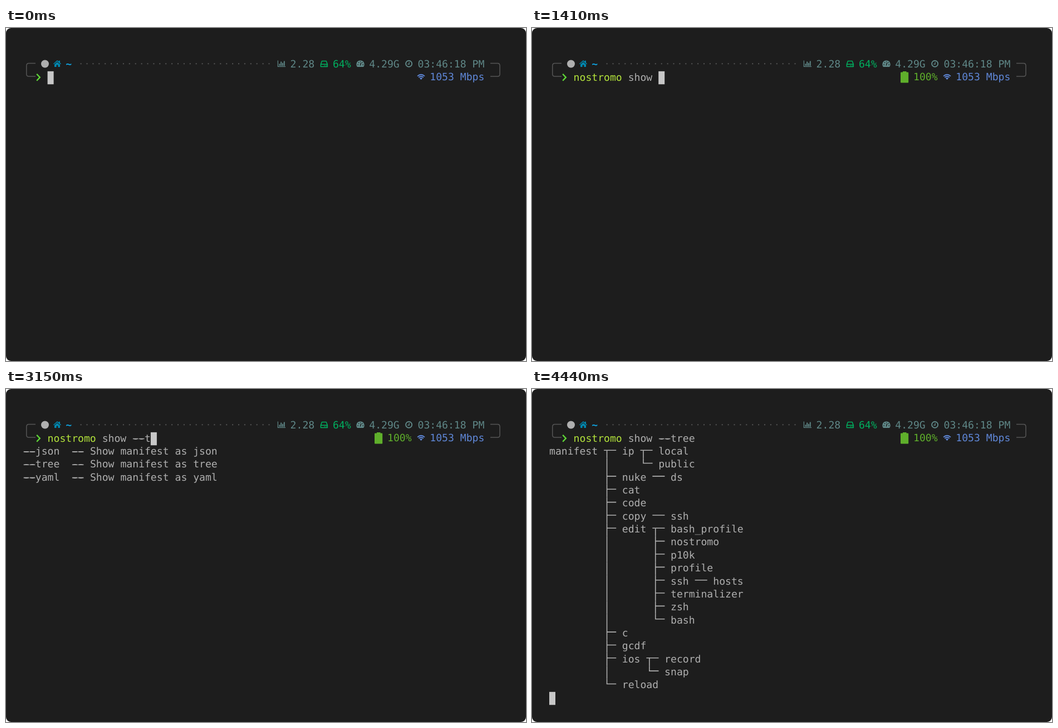
Write an HTML page that moves like this. It is 934 by 599 pixels and loops after 6440 ms.

```html
<!DOCTYPE html>
<html lang="en">
<head>
<meta charset="utf-8">
<title>Terminal session</title>
<style>
  html, body { margin: 0; width: 100%; height: 100%; overflow: hidden; background: #fff; }
  svg { display: block; width: 934px; height: 599px; }
  text { font: 18.1px "DejaVu Sans Mono", monospace; text-rendering: geometricPrecision; }
  .bold { font-weight: bold; }
</style>
</head>
<body>
<svg viewBox="0 0 934 599">
  <rect width="934" height="599" rx="9" fill="#1d1d1d"/>
  <g fill="none" stroke="#555" stroke-width="1.5">
    <path d="M53 63.6H41Q36.8 63.6 36.8 68V83Q36.8 87 41 87H53M870 63.6H883Q887 63.6 887 68V83Q887 87 883 87H870"/>
    <path d="M133.6 64.2H474" stroke-width="2" stroke-dasharray="2 8.9"/>
  </g>
  <circle cx="70" cy="64.5" r="7" fill="#afafaf"/>
  <!-- home -->
  <path fill="#0087af" d="M85 64.3 92 58l2.6 2.3V58.7H97v3.8l2 1.8-.9 1L92 60l-6.2 5.3zM87 65.5 92 61.3l5 4.2V70h-3.6v-3.6h-2.8V70H87z"/>
  <!-- load -->
  <path fill="none" stroke="#5f8787" stroke-width="1.2" d="M488.4 58.5V69.4H502"/>
  <path fill="none" stroke="#5f8787" stroke-width="1.9" d="M491.4 68V64.3M494.2 68V60.6M497 68V62.8M499.8 68V59.5"/>
  <!-- disk -->
  <path fill="none" stroke="#00af5f" stroke-width="1.5" stroke-linejoin="round" d="M565.4 65.2 567.4 59.6H575.2L577.3 65.2V69.4H565.4ZM565.4 65.2H577.3M571.6 67.4h1.4M574.4 67.4h1.4"/>
  <!-- memory -->
  <path fill="#5f8787" d="M631 70A7.2 7.2 0 1 1 642 70Z"/>
  <path fill="none" stroke="#1d1d1d" stroke-width="1.4" d="M636.2 67.5 637.8 62.3M631.4 66h1.6M632.8 62.2h1.5M636 60.4h1.3M639.4 62.2h1.4M640.4 66h1.6"/>
  <!-- clock -->
  <g fill="none" stroke="#5f8787">
    <circle cx="723.6" cy="64.3" r="5.5" stroke-width="1.9"/>
    <path d="M724.2 61V65H721.3" stroke-width="1.3"/>
  </g>
  <!-- wifi -->
  <path fill="none" stroke="#5f87d7" stroke-width="1.8" d="M739 86.7Q745.5 80.7 752 86.7M741.2 88.9Q745.5 85 749.8 88.9"/>
  <path fill="#5f87d7" d="M743 90.4Q745.5 88.3 748 90.4L745.5 93Z"/>
  <!-- battery -->
  <path id="battery" fill="#5faf2b" d="M663 79.6H666V78H672.5V79.6H675.3Q676.2 79.6 676.2 80.6V97.4Q676.2 98.4 675.3 98.4H663Q662 98.4 662 97.4V80.6Q662 79.6 663 79.6Z"/>
  <path fill="none" stroke="#5fd737" stroke-width="2.4" d="M55.2 82.8 60.8 88.8 55.2 94.8"/>
  <g id="status"></g>
  <g id="charge"></g>
  <g id="command"></g>
  <g id="list"></g>
  <g id="tree"></g>
  <rect id="cursor" width="11" height="23.4" fill="#c7c7c7"/>
</svg>
<script>
const LOOP = 6440, CELL = 10.9, ROW = 23.35, GREY = '#afafaf';
const colX = col => 31 + col * CELL;
const rowY = row => 54.5 + row * ROW;
const $ = id => document.getElementById(id);

function add(parent, tag, attrs, content = '') {
  const el = document.createElementNS('http://www.w3.org/2000/svg', tag);
  for (const key in attrs) el.setAttribute(key, attrs[key]);
  el.textContent = content;
  parent.append(el);
}

function write(parent, col, row, string, fill = GREY, shift = 16.8, style = '') {
  add(parent, 'text', { x: colX(col), y: rowY(row) + shift, fill, class: style }, string);
}

// Box characters become strokes, hyphens are widened to nearly fill their cell.
function writeLine(parent, row, line, col = 0) {
  const y = rowY(row), mid = y + 9;
  let strokes = '', dashes = '';
  [...line].forEach((char, i) => {
    const x = colX(col + i), centre = x + CELL / 2;
    if ('─┬'.includes(char)) strokes += `M${x} ${mid}h${CELL + 0.3}`;
    if ('├└'.includes(char)) strokes += `M${centre} ${mid}H${x + CELL}`;
    if ('│├'.includes(char)) strokes += `M${centre} ${y}v${ROW}`;
    if (char === '┬') strokes += `M${centre} ${mid}V${y + ROW}`;
    if (char === '└') strokes += `M${centre} ${y}V${mid + 0.8}`;
    if (char === '-') dashes += `M${x + 0.7} ${y + 11.7}h9.6`;
  });
  for (const word of line.matchAll(/[^ ─│┬├└]+/g)) write(parent, col + word.index, row, word[0]);
  add(parent, 'path', { d: strokes + dashes, fill: 'none', stroke: GREY, 'stroke-width': 1.6 });
}

const status = $('status');
write(status, 7, 0, '~', '#0fa3e0', 16.8, 'bold');
write(status, 44, 0, '2.28', '#5f8787', 16.2);
write(status, 51, 0, '64%', '#00af5f', 16.2);
write(status, 57, 0, '4.29G', '#5f8787', 16.2);
write(status, 65, 0, '03:46:18 PM', '#5f8787', 16.2);
write(status, 67, 1, '1053 Mbps', '#5f87d7', 16.2);
write($('charge'), 60, 1, '100%', '#5faf2b', 16.2);

['json', 'tree', 'yaml'].forEach((format, i) =>
  writeLine($('list'), i + 2, `--${format}  -- Show manifest as ${format}`));

`manifest ┬─ ip ┬─ local
         │     └─ public
         ├─ nuke ── ds
         ├─ cat
         ├─ code
         ├─ copy ── ssh
         ├─ edit ┬─ bash_profile
         │       ├─ nostromo
         │       ├─ p10k
         │       ├─ profile
         │       ├─ ssh ── hosts
         │       ├─ terminalizer
         │       ├─ zsh
         │       └─ bash
         ├─ c
         ├─ gcdf
         ├─ ios ┬─ record
         │      └─ snap
         └─ reload`.split('\n').forEach((line, i) => writeLine($('tree'), i + 2, line));

// Start time and command line; Tab completes several letters at once.
const typing = [
  [0, ''], [320, 'n'], [400, 'no'], [480, 'nos'], [730, 'nostromo '],
  [980, 'nostromo s'], [1190, 'nostromo sh'], [1410, 'nostromo show '],
  [1660, 'nostromo show -'], [1890, 'nostromo show --'],
  [3150, 'nostromo show --t'], [3420, 'nostromo show --tree ']
];
const PROMPT = 4;
let shown;

function showCommand(line) {
  if (line === shown) return;
  shown = line;
  const group = $('command'), name = line.split(' ')[0], known = name === 'nostromo';
  group.replaceChildren();
  write(group, PROMPT, 1, name, known ? '#b3e33b' : '#fc4384', 16.8, known ? '' : 'bold');
  writeLine(group, 1, line.slice(name.length), PROMPT + name.length);
  if (line.endsWith(' s')) add(group, 'rect', { x: colX(13), y: 98.8, width: CELL, height: 1.3, fill: GREY });
}

const toggle = (id, on) => $(id).setAttribute('visibility', on ? 'visible' : 'hidden');

function render(now) {
  const t = now % LOOP;
  const line = typing.findLast(([start]) => t >= start)[1];
  showCommand(line);
  toggle('battery', t >= 20);
  toggle('charge', t >= 20);
  toggle('list', t >= 2480 && t < 4420);
  toggle('tree', t >= 4440);
  const entered = t >= 4420;
  $('cursor').setAttribute('x', colX(entered ? 0 : PROMPT + line.length));
  $('cursor').setAttribute('y', rowY(!entered ? 1 : t < 4440 ? 2 : 21));
}

const begin = performance.now();
function tick() {
  render(performance.now() - begin);
  requestAnimationFrame(tick);
}
tick();
</script>
</body>
</html>
```
